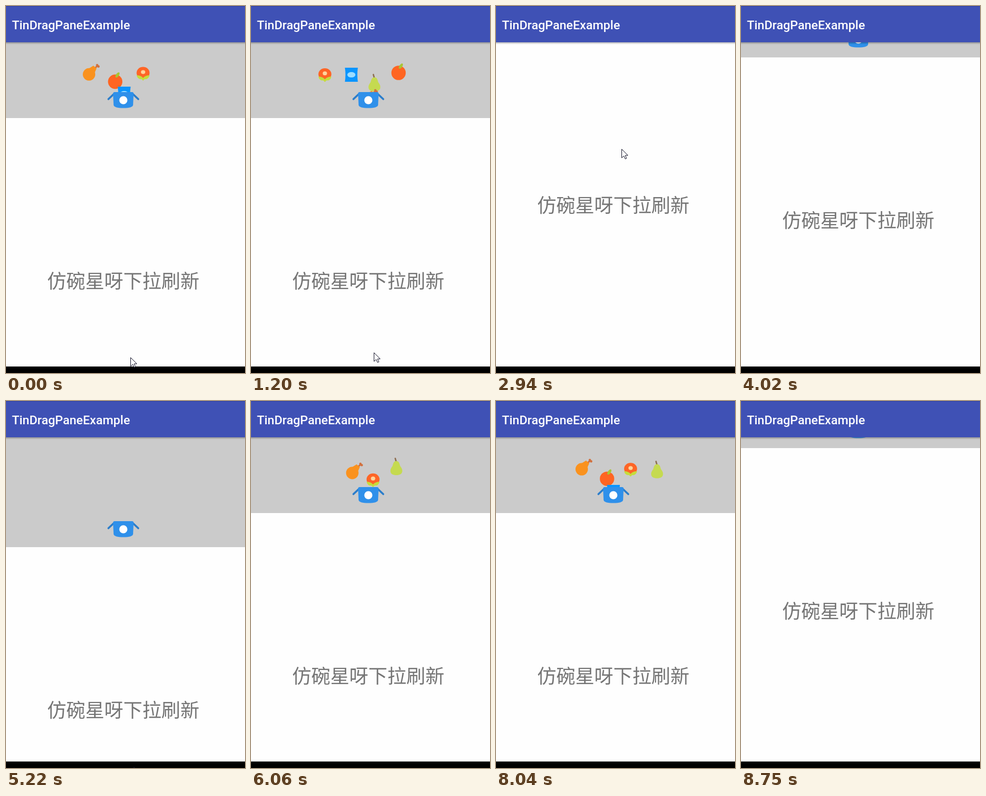
Recreate the animation shown at these times as an HTML page with a canvas. Size 442 by 678 pixels, loop 8850 ms.

```html
<!DOCTYPE html>
<html>
<head>
<meta charset="utf-8">
<style>
  html, body { margin: 0; overflow: hidden; background: #fefefe; }
  canvas { display: block; }
</style>
</head>
<body>
<canvas id="stage" width="442" height="678"></canvas>
<script>
const ctx = document.getElementById('stage').getContext('2d');
const LOOP = 8850, BAR = 67, REST = 140, MAX_PULL = 203, STEP = 177;
const clamp = (v, lo, hi) => Math.min(hi, Math.max(lo, v));

// Pointer keyframes: time, x, y
const pointerKeys = [
  [0, 230, 649], [930, 230, 649], [1200, 227, 640], [1800, 228, 575],
  [2640, 232, 264], [2950, 232, 264], [3540, 236, 654], [3600, 238, 700],
  [4100, 238, 700], [4160, 238, 647], [4680, 233, 264], [4830, 233, 264],
  [5220, 236, 676], [5280, 238, 700], [LOOP, 238, 700]
];

function pointerAt(t) {
  const i = pointerKeys.findIndex(k => k[0] > t);
  const [t0, x0, y0] = pointerKeys[i - 1], [t1, x1, y1] = pointerKeys[i];
  const p = (t - t0) / (t1 - t0);
  return { x: Math.round(x0 + (x1 - x0) * p), y: Math.round(y0 + (y1 - y0) * p) };
}

// Remaining share of a one second viscous scroll
function remaining(ms) {
  const x = ms / 1000 * 8;
  if (x <= 0) return 1;
  if (x >= 8) return 0;
  return x < 1 ? 2 - x - Math.exp(-x) : 0.632 * Math.exp(1 - x);
}

function pullAt(t) {
  const drag = clamp((pointerAt(t).y - 270) / 2, 0, MAX_PULL);
  if (t < 2950) return REST * remaining(t - 2130);
  if (t < 3705) return drag;
  if (t < 4830) return MAX_PULL * remaining(t - 3705);
  if (t < 5220) return drag;
  if (t < 8439) return REST + (MAX_PULL - REST) * remaining(t - 5220);
  return REST * remaining(t - 8439);
}

function ellipse(color, x, y, rx, ry = rx, turn = 0) {
  ctx.fillStyle = color;
  ctx.beginPath();
  ctx.ellipse(x, y, rx, ry, turn, 0, 7);
  ctx.fill();
}

function shape(color, d) {
  ctx.fillStyle = color;
  ctx.fill(new Path2D(d));
}

function line(color, width, x0, y0, x1, y1) {
  ctx.strokeStyle = color;
  ctx.lineWidth = width;
  ctx.lineCap = 'round';
  ctx.beginPath();
  ctx.moveTo(x0, y0);
  ctx.lineTo(x1, y1);
  ctx.stroke();
}

function pear() {
  line('#8d6e50', 2.6, -2, -16, 0, -9);
  shape('#c5da50', 'M0-11C5-11 6-6 7-2C9 1 11 3 11 7C11 13 6 15 0 15S-11 13-11 7C-11 3-9 1-7-2C-6-6-5-11 0-11Z');
}

function drumstick() {
  line('#d2713f', 3, 8, -7, 14, -12);
  ellipse('#d2713f', 13, -13, 2.2);
  ellipse('#d2713f', 15.5, -10.5, 2.2);
  shape('#fa921e', 'M-2-7L6-12L12-7L8 2Z');
  ellipse('#fa921e', -2, 4, 11.5);
}

function bun() {
  ellipse('#ff6526', 0, -1.5, 12, 11);
  ellipse('#ffd49a', 0, -3, 4, 3.6);
  shape('#c6dc3c', 'M-12 3Q-4 3 0 8Q4 3 12 3Q10 11 3 10L0 13L-3 10Q-10 11-12 3Z');
}

function orange() {
  ellipse('#ff6522', 0, 1.5, 13.3);
  ellipse('#a9c534', 4.3, -11, 2.7, 5.6, 0.6);
}

function snack() {
  shape('#0a95ff', 'M-12-13H12Q10 0 12 13H-12Q-10 0-12-13Z');
  ellipse('#9bdcff', 0, 0, 7.5, 5);
}

// Launch order, with flight time in steps
const foods = [[pear, 4.2], [drumstick, 4.6], [bun, 4.6], [orange, 4.6], [snack, 4.6]];

function drawFoods(t, edge) {
  const first = t < 2130, steps = first ? t / STEP + 4.23 : (t - 5556) / STEP;
  if (steps < 0 || (!first && t >= 8439)) return;
  for (let n = Math.max(0, Math.floor(steps) - 4); n <= steps; n++) {
    const [draw, life] = foods[n % 5], w = steps - n;
    if (w > life) continue;
    const side = n % 2 ? -1 : 1, s = 3 - w;
    ctx.save();
    ctx.translate(217 + side * w * (5 + 6.75 * w - 0.75 * w * w), edge - 85 + 5.25 * s * s);
    draw();
    ctx.restore();
  }
}

function drawBox(edge, pull) {
  const angle = clamp((pull - 40) / 100, 0, 1) * Math.PI * 0.74;
  ctx.save();
  ctx.translate(217, edge - 48);
  for (const side of [-1, 1]) {
    line('#2a7dcb', 3.6, side * 18, 4, side * (18 - 14 * Math.cos(angle)),
      4 - 14 * Math.sin(angle) + 20 * Math.max(0, angle / Math.PI - 0.5) * 4);
  }
  shape('#2f90ea', 'M-19 3Q-19 0-16 0H16Q19 0 19 3L18 24Q17 29.5 0 29.5T-18 24Z');
  ellipse('#fff', 0, 15, 7.5);
  ctx.restore();
}

function drawHeader() {
  const shade = ctx.createLinearGradient(0, BAR, 0, BAR + 4);
  shade.addColorStop(0, 'rgba(0,0,0,.28)');
  shade.addColorStop(1, 'rgba(0,0,0,0)');
  ctx.fillStyle = shade;
  ctx.fillRect(0, BAR, 442, 4);
  ctx.fillStyle = '#3f51b5';
  ctx.fillRect(0, 0, 442, BAR);
  ctx.fillStyle = '#303f9f';
  ctx.fillRect(0, 0, 442, 1);
  ctx.fillStyle = '#fff';
  ctx.font = '500 22.7px Roboto, sans-serif';
  ctx.textAlign = 'left';
  ctx.fillText('TinDragPaneExample', 11, 43);
}

function drawPointer({ x, y }) {
  ctx.save();
  ctx.translate(x + 0.5, y + 0.5);
  const arrow = new Path2D('M0 0V16L4 12.5L6.5 18L9 17L6.5 11.5H11.5Z');
  ctx.fillStyle = '#fff';
  ctx.fill(arrow);
  ctx.strokeStyle = '#15152a';
  ctx.lineWidth = 1;
  ctx.stroke(arrow);
  ctx.restore();
}

function render(t) {
  const pull = Math.round(pullAt(t)), edge = BAR + pull;
  ctx.fillStyle = '#cbcbcb';
  ctx.fillRect(0, 0, 442, 678);
  drawFoods(t, edge);
  drawBox(edge, pull);
  ctx.fillStyle = '#fefefe';
  ctx.fillRect(0, edge, 442, 678);
  ctx.fillStyle = '#757575';
  ctx.font = '35.2px "Noto Sans CJK SC", "Noto Sans CJK", sans-serif';
  ctx.textAlign = 'center';
  ctx.fillText('仿碗星呀下拉刷新', 217, 381 + pull);
  drawHeader();
  ctx.fillStyle = '#000';
  ctx.fillRect(0, 666, 442, 12);
  drawPointer(pointerAt(t));
}

function tick() {
  render(performance.now() % LOOP);
  requestAnimationFrame(tick);
}
tick();
</script>
</body>
</html>
```
